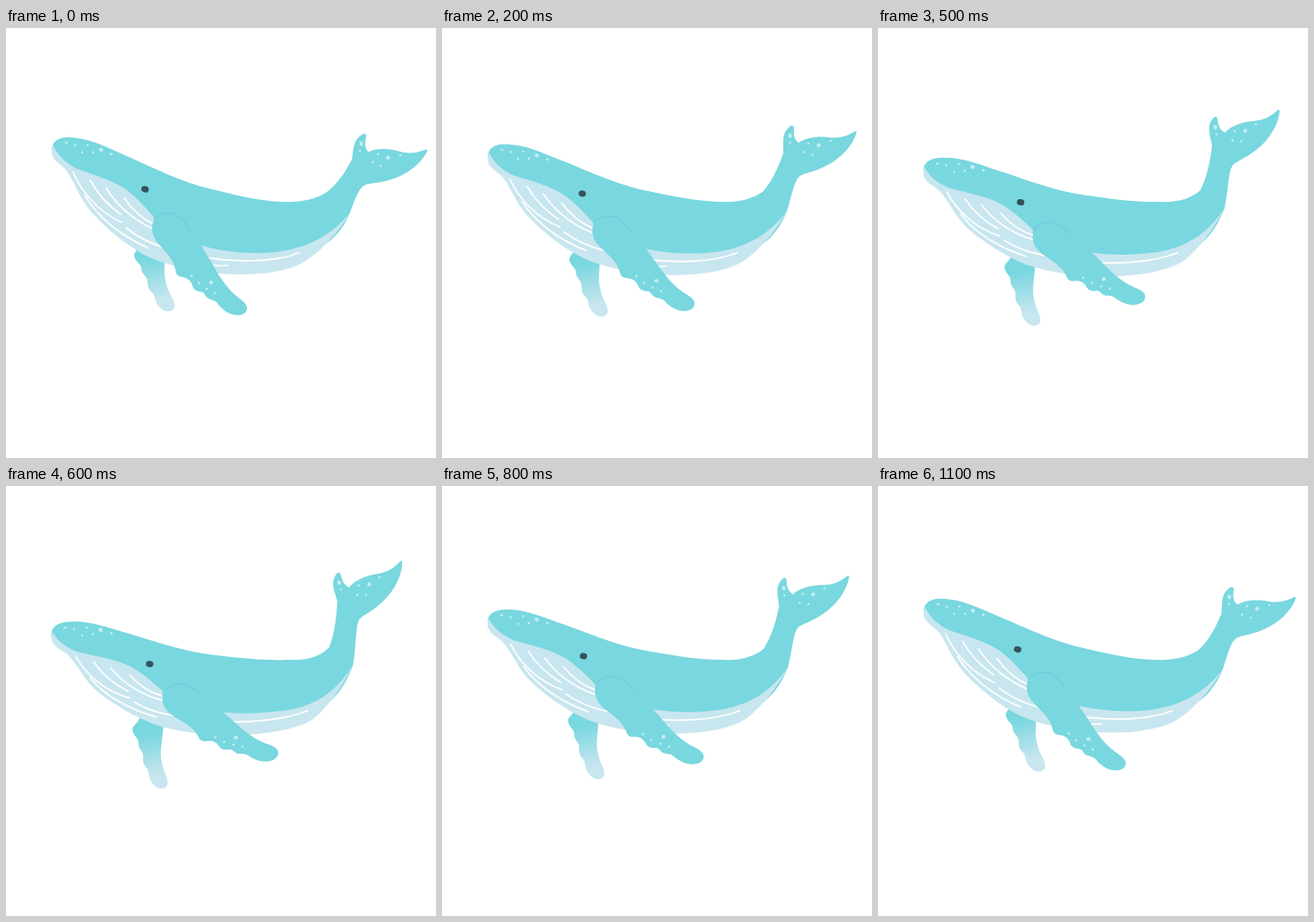
An HTML page that plays this animation: 480x480 px, repeating every 1.2 s.

```html
<!DOCTYPE html>
<html lang="en">
<head>
<meta charset="utf-8">
<title>Swimming whale</title>
<style>
  html, body { margin: 0; width: 100%; height: 100%; overflow: hidden; background: #fff; }
  svg { display: block; width: 100%; height: 100%; }
  .skin { fill: #79d7df; }
  .belly { fill: #c8e6ef; }
  .line, .spot { fill: none; stroke-linecap: round; }
  .line { stroke: #fff; stroke-width: 1.7; }
  .spot { stroke: #c3eeef; stroke-width: 2.3; }
  .big { stroke-width: 4; }
  .eye { fill: none; stroke: #35525a; stroke-width: 6.8; stroke-linecap: round; }
  .shade { fill: none; stroke: #62c6d0; stroke-width: 1.5; opacity: .45; stroke-linecap: round; }
</style>
</head>
<body>
<svg viewBox="0 0 480 480">
  <defs>
    <linearGradient id="fade" gradientUnits="userSpaceOnUse" x1="160" y1="258" x2="172" y2="304">
      <stop offset="0" stop-color="#79d7df"/>
      <stop offset="1" stop-color="#c8e6ef"/>
    </linearGradient>
  </defs>

  <path id="farFin" fill="url(#fade)" d="M150,238 C149,247 143,249 143,254 C144,261 151,263 151,268 C151,275 158,277 158,283 C158,290 160,293 164,296 C167,300 166,307 171,311 C175,316 180,317 184,316 C190,314 189,308 186,302 C181,294 178,285 177,276 L177,240 Z"/>

  <!-- body -->
  <path class="bend skin" d="M51,135 C52,126 59,122 69,122 C92,122 112,133 135,143 C165,156 195,172 230,180 C262,188 285,193 307,194 C330,195 345,191 357,184 C371,174 380,158 386,147 C388,137 387,126 396,120 C400,117 402.5,117.5 402,122 C400.5,128 400,133 404.5,138.5 C412,134 428,134 440,138 C452,141 460,139 469,135.5 Q471,135.5 470,138 C464,150 450,163 430,169 C418,173 408,173 401,175 C393,179 389,193 384,206 C372,236 350,250 320,254 L230,256 C190,240 160,210 130,190 L62,148 Z"/>
  <path class="bend belly" d="M52.3,129.5 C56,140 65,150 79,157 C97,164 118,169 135,181 C148,191 158,203 168,215 C183,231 203,240 218,243 C240,249 266,252 290,251 C330,249 362,234 384,206 C375,223 354,248 333,261 C316,271 290,275 262,275 C225,275 188,268 160,256 C135,244 110,222 95,205 C83,191 77,174 70,163 C65,153 52,150 51,139 Z"/>

  <!-- throat and belly grooves -->
  <path class="bend line" d="M75,161 C84,183 103,205 129,217"/>
  <path class="bend line" d="M94,170 C102,185 114,198 128,208"/>
  <path class="bend line" d="M112,179 C124,199 145,216 166,225"/>
  <path class="bend line" d="M132,190 C141,203 153,214 167,220"/>
  <path class="bend line" d="M88,187 C102,211 130,233 158,245"/>
  <path class="bend line" d="M134,223 C147,234 162,241 180,246"/>
  <path class="bend line" d="M215,255 C255,262 300,262 327,251"/>
  <path class="bend line" d="M215,263 Q232,266 248,265"/>

  <!-- speckles -->
  <path class="bend spot" d="M67,128 L68,128.2 M77,131 L77.2,131 M91,131 L91.2,131 M85,139 L85.2,139 M97,139 L97.2,139 M117,140.5 L118,140.8"/>
  <path class="bend spot big" d="M105.6,135.5 L106.6,136"/>
  <path class="bend spot" d="M395,137 L395.2,137 M409,150 L409.5,149.5 M418,154 L418.2,154 M415,141 L415.4,141 M440,142 L440.2,142"/>
  <path class="bend spot big" d="M396.5,128.5 L396.6,129.5 M426,145 L426.6,144.5"/>
  <path class="bend eye" d="M154.5,179.8 L155.9,180.2"/>

  <g id="nearFin">
    <path class="skin" d="M163,223 C164,211 171,207 181,207 C192,207 198,213 204,222 C213,235 222,249 229,261 C237,275 245,289 257,299 C265,305 270,309 269,314 C268,319 263,321 257,320.5 C249,320 243,315 238,310 C235,304 230,304 226,302 C222,300 222,295 218,294.5 C213,294 209,292 208,287 C206,281 202,279 197,278 C191,277 190,275 189,269 C187,259 180,252 173,244 C166,236 163,231 163,223 Z"/>
    <path class="shade" d="M165,214 C170,206 187,204 196,213 C200,217 203,221 206,226"/>
    <path class="spot" d="M207,276.5 L207.4,277 M215,285 L215.4,284.6 M224,291 L224.4,291 M233,296 L233.2,296"/>
    <path class="spot big" d="M228.6,284 L229.4,284"/>
  </g>
</svg>
<script>
  const STEP = 100, LAST = 6;

  // One value per pose, from tail low to tail high.
  const tailTurn = [0, 5.1, 9, 12.5, 16.1, 20.6, 24.6];
  const headDrop = [0, 4, 8, 12, 16.5, 24, 31];
  const near = { turn: [0, -3, -5.4, -8, -10.8, -14.3, -17.6], x: [0, 3, 5, 6.5, 8, 10, 12], y: [0, 1, 3, 4.5, 6, 10, 14] };
  const far = { turn: [0, 1.2, 2.4, 3.6, 4.8, 5.2, 6], x: [0, -0.5, -1, -1.5, -2.5, -2, -2], y: [0, 2, 5, 7, 9.5, 14.5, 19.5] };

  const clamp = v => Math.max(0, Math.min(1, v));
  const smooth = v => (v = clamp(v), v * v * (3 - 2 * v));

  // Nods the head around the mid back and swings the tail around its root.
  function warp(x, y, pose) {
    const nod = headDrop[pose] / 240;
    const soft = 1 - 0.5 * clamp((y - 200) / 75);
    const px = x + nod * (y - 140) * soft * clamp((380 - x) / 50);
    const py = y + nod * Math.max(0, 300 - x) * soft;

    const a = tailTurn[pose] * Math.PI / 180 * smooth((x - 1.4 * y - 75) / 60) * smooth((x - 320) / 40);
    const dx = px - 336, dy = py - 175;
    return [336 + dx * Math.cos(a) + dy * Math.sin(a), 175 - dx * Math.sin(a) + dy * Math.cos(a)];
  }

  const bends = [...document.querySelectorAll('.bend')].map(el => ({ el, d: el.getAttribute('d') }));

  function place(id, fin, pose, cx, cy) {
    document.getElementById(id).setAttribute('transform',
      `translate(${fin.x[pose]} ${fin.y[pose]}) rotate(${fin.turn[pose]} ${cx} ${cy})`);
  }

  function draw(pose) {
    for (const { el, d } of bends) {
      el.setAttribute('d', d.replace(/([\d.]+),([\d.]+)/g,
        (_, x, y) => warp(+x, +y, pose).map(v => v.toFixed(2)).join(',')));
    }
    place('nearFin', near, pose, 181, 225);
    place('farFin', far, pose, 162, 255);
  }

  let shown = -1;
  function tick() {
    const n = Math.floor(performance.now() / STEP) % (2 * LAST);
    const pose = n <= LAST ? n : 2 * LAST - n;
    if (pose !== shown) draw(shown = pose);
    requestAnimationFrame(tick);
  }
  tick();
</script>
</body>
</html>
```
